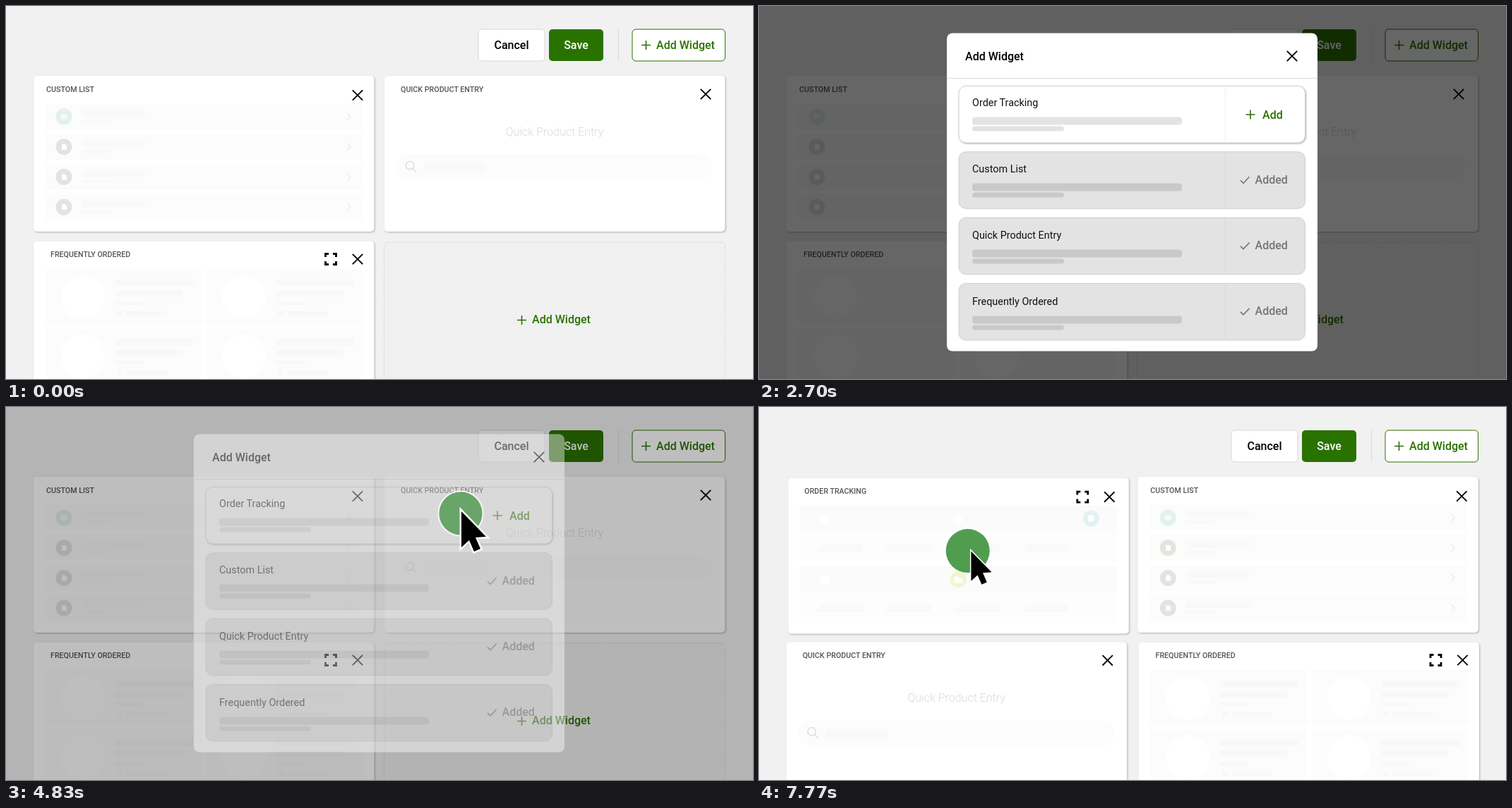
Recreate the animation shown at these times as an HTML page. Size 1058x529 px, loop 8000 ms.

```html
<!DOCTYPE html>
<html lang="en">
<head>
<meta charset="utf-8">
<title>Add and arrange widgets</title>
<style>
  html, body { margin: 0; width: 100%; height: 100%; overflow: hidden; background: #f1f1f1; }
  svg { display: block; width: 100vw; height: 100vh; font-family: Roboto, Inter, sans-serif; }
  .button { font-size: 16px; font-weight: 500; }
  .heading { font-size: 10.7px; font-weight: 500; fill: #555; }
  .label { font-size: 14.4px; fill: #111; }
  .card { fill: #fff; filter: drop-shadow(1px 1px 1px rgba(0, 0, 0, .28)); }
</style>
</head>
<body>
<svg id="stage" viewBox="0 0 1058 529"></svg>
<script>
const GREEN = '#2a7200';
const LOOP = 8000, STEP = 30;

// Drawing helpers
const rect = (x, y, w, h, fill, r = 0, more = '') =>
  `<rect x="${x}" y="${y}" width="${w}" height="${h}" rx="${r}" fill="${fill}" ${more}/>`;
const circle = (x, y, r, fill) => `<circle cx="${x}" cy="${y}" r="${r}" fill="${fill}"/>`;
const line = (d, color, width) =>
  `<path d="${d}" fill="none" stroke="${color}" stroke-width="${width}"/>`;
const text = (x, y, str, cls, more = '') => `<text x="${x}" y="${y}" class="${cls}" ${more}>${str}</text>`;
const group = (id, body) => `<g id="${id}">${body}</g>`;
const times = (n, draw) => Array.from({ length: n }, (_, i) => draw(i)).join('');

const cross = (x, y) => line(`M${x - 7.2} ${y - 7.2}l14.4 14.4m0 -14.4l-14.4 14.4`, '#000', 1.9);
const plus = (x, y) => line(`M${x - 6.5} ${y}h13M${x} ${y - 6.5}v13`, GREEN, 1.6);
const expand = (x, y) => line(
  `M${x - 7.5} ${y - 3}v-4.5h4.5m6 0h4.5v4.5m0 6v4.5h-4.5m-6 0h-4.5v-4.5`, '#000', 2.8);
const panel = (x, y, title, titleX, titleY) =>
  `<rect class="card" x="${x}" y="${y}" width="482.5" height="221" rx="5"/>` +
  text(titleX, titleY, title, 'heading');

function toolbar() {
  return rect(669, 33, 94, 45, '#fff', 5, 'stroke="#d8d8d8"') +
    text(716, 60.5, 'Cancel', 'button', 'text-anchor="middle"') +
    rect(769, 33, 77, 45, GREEN, 5) +
    text(807.5, 60.5, 'Save', 'button', 'text-anchor="middle" fill="#fff"') +
    line('M867.5 32v46', '#dadada', 1) +
    rect(887, 33, 131.5, 45, '#fff', 5, `stroke="${GREEN}"`) +
    plus(906.5, 55.5) + text(921, 60.5, 'Add Widget', 'button', `fill="${GREEN}"`);
}

function placeholder() {
  return rect(535.5, 335, 483, 221, '#f0f0f0', 5, 'stroke="#cfcfcf" stroke-dasharray="1.5 1.5"') +
    plus(730.5, 445.5) + text(745, 450, 'Add Widget', 'button', `fill="${GREEN}"`);
}

function customList() {
  return panel(39, 99, 'CUSTOM LIST', 57, 122) + cross(498, 126.5) + times(4, i => {
    const y = 157 + i * 42.7;
    const icon = i
      ? `<path d="M79 ${y - 4}h4.5l2.5 2.5v5.5h-7z" fill="#fff"/>`
      : rect(77.5, y - 3.5, 9, 7, '#f6fbfa', 1);
    return rect(56, y - 18.5, 449, 37, '#fcfcfc', 2) +
      circle(82, y, 11.5, i ? '#e3e4de' : '#e1f1ef') + icon +
      rect(108, y - 9, 89, 9, '#f9f9f9') + rect(108, y + 4, 40, 5, '#f9f9f9') +
      line(`M483 ${y - 5}l5 5l-5 5`, '#e9e9e9', 1.2);
  });
}

function quickEntry() {
  return panel(536, 99, 'QUICK PRODUCT ENTRY', 559, 122) + cross(991, 125) +
    text(777, 184, 'Quick Product Entry', '',
      'font-size="16" font-weight="300" text-anchor="middle" fill="#dadada"') +
    rect(553, 210, 448, 36, '#fcfcfc', 18) +
    `<circle cx="572" cy="226" r="5.7" fill="none" stroke="#ddd" stroke-width="1.5"/>` +
    line('M576 230.500l5 5', '#ddd', 1.5) + rect(592, 223, 88, 13, '#f9f9f9', 2);
}

function frequentlyOrdered() {
  return panel(39, 333.5, 'FREQUENTLY ORDERED', 63, 356) + expand(460, 359) + cross(498, 359) +
    times(4, i => {
      const x = 56 + (i % 2) * 228, y = 373 + (i >> 1) * 84;
      const bar = (dx, dy, w, h) => rect(x + dx, y + dy, w, h, '#f8f8f8');
      return rect(x, y, 222, 79, '#fcfcfc', 2) + circle(x + 53, y + 40, 31, '#fff') +
        bar(99, 15, 110, 9) + bar(99, 30, 95, 9) + bar(99, 46, 40, 5) +
        circle(x + 105, y + 63, 4, '#f8f8f8') + bar(115, 60, 57, 6);
    });
}

function orderTracking() {
  return panel(536, 335, 'ORDER TRACKING', 559, 357) + expand(953, 362) + cross(991, 362) +
    times(2, i => {
      const y = 374 + i * 86;
      const dots = circle(588, y + 20, 7, '#fff') + (i
        ? circle(777, y + 19, 11.5, '#f3f5cd') +
          `<path d="M771 ${y + 15}h7v2h3l2.500 3v4h-12.500z" fill="#fff"/>`
        : circle(776, y + 20, 7, '#fff') + circle(965, y + 18.5, 11.5, '#e3f2f1') +
          rect(961, y + 14, 8, 9, '#fff', 1));
      return rect(552, y, 449.5, 38, '#fbfbfb', 2) + rect(552, y + 38, 449.5, 42, '#fdfdfd', 2) + dots +
        times(4, k => rect(582 + k * 97, y + 55, 60, 4, '#f9f9f9') +
          rect(577 + k * 97, y + 60, 64, 5, '#f9f9f9'));
    });
}

function modal() {
  const names = ['Order Tracking', 'Custom List', 'Quick Product Entry', 'Frequently Ordered'];
  return rect(266, 38.5, 525, 451, '#fff', 8) + text(292, 77, 'Add Widget', 'button') + cross(755, 71) +
    line('M266 102.500h525', '#d9d9d9', 1.2) +
    names.map((name, i) => {
      const y = 113.5 + i * 93.3, row = i * 94;
      const bar = i ? '#c9c9c9' : '#e3e3e3';
      const action = i
        ? line(`M682 ${y + 40.500}l4 4l8.500 -9`, '#757575', 1.6) +
          text(702.5, y + 45, 'Added', 'button', 'fill="#757575"')
        : plus(696, 154) + text(713, 159.5, 'Add', 'button', `fill="${GREEN}"`);
      return `<rect x="283" y="${y}" width="490.500" height="80.500" rx="10" fill="${i ? '#e3e3e3' : '#fff'}"
        stroke="#cfcfcf" ${i ? '' : 'style="filter:drop-shadow(1px 1.5px 1px rgba(0,0,0,.3))"'}/>` +
        line(`M660 ${y}v80.500`, i ? '#d9d9d9' : '#eee', 1) +
        text(302, 142 + row, name, 'label') +
        rect(302, 157.5 + row, 297, 11, bar, 4) + rect(302, 170.5 + row, 130, 7, bar, 3.5) + action;
    }).join('');
}

const stage = document.getElementById('stage');
stage.innerHTML = rect(0, 0, 1058, 529, '#f1f1f1') + toolbar() +
  group('placeholder', placeholder()) + group('frequent', frequentlyOrdered()) +
  group('quick', quickEntry()) + group('custom', customList()) + group('order', orderTracking()) +
  rect(0, 0, 1058, 529, '#000', 0, 'id="shade"') + group('modal', modal()) +
  group('cursor',
    `<circle id="halo" r="31" fill="#268626"/>
     <circle id="ring" r="31.5" fill="none" stroke="#fff" stroke-width="2"/>
     <path id="arrow" d="M0 0V51L11 41L18 57L27 53L20 37L35 36Z" stroke="#fff" paint-order="stroke"/>`);

const el = Object.fromEntries([...stage.querySelectorAll('[id]')].map(node => [node.id, node]));
const set = (node, attrs) => Object.entries(attrs).forEach(([k, v]) => node.setAttribute(k, v));

// Timing helpers
const span = (t, from, to) => Math.min(1, Math.max(0, (t - from) / (to - from)));
const mix = (a, b, p) => a + (b - a) * p;
const easeInOut = p => p < .5 ? 2 * p * p : 1 - 2 * (1 - p) ** 2;
const easeOut = p => 1 - (1 - p) ** 1.65;
const shift = (x, y, p) => ({ transform: `translate(${x * p} ${y * p})` });

function drawCursor(t, drag) {
  const first = t < 3000;
  const visible = first ? span(t, 900, 1020) - span(t, 2580, 2700) : span(t, 3480, 3600);
  const press = first ? span(t, 1770, 1860) : span(t, 4350, 4440);
  const click = press * (1 - span(t, 5160, 5280));
  const hold = span(t, 6240, 6360);
  const move = easeInOut(span(t, 5310, 5970));

  const x = first ? 929 : mix(mix(644, 763, move), 293.5, drag);
  const y = first ? 55 : mix(mix(151, 428, move), 203, drag);
  const scale = 1 - .28 * press * (1 - press) - .17 * hold;
  const dx = 1 + (1 - scale) * 22 - (first ? 3 : 0);
  const dy = -3 + (1 - scale) * 20 + (first ? 6 : 0);

  set(el.cursor, { transform: `translate(${x} ${y})`, opacity: visible });
  set(el.halo, { 'fill-opacity': .17 + .45 * click + .63 * hold });
  set(el.ring, { opacity: .8 * click });
  set(el.arrow, {
    transform: `translate(${dx} ${dy}) scale(${scale})`,
    'stroke-width': 3.5 + 1.5 * click
  });
}

function draw(time) {
  const t = Math.floor(time / STEP) * STEP;

  const enter = span(t, 1800, 2640);
  const open = enter - span(t, 4380, 5160);
  const zoom = mix(.764, 1, enter);
  set(el.shade, { opacity: .6 * open });
  set(el.modal, {
    opacity: open,
    transform: `translate(528.5 264) scale(${zoom}) translate(-528.5 -264)`
  });

  const appear = span(t, 5160, 5340);
  const drag = easeOut(span(t, 7020, 7800));
  const pop = mix(1.06, 1, appear);
  set(el.placeholder, { opacity: appear < 1 ? 1 : 0 });
  set(el.order, {
    opacity: appear,
    transform: `translate(${777 - 497 * drag} ${445 - 235.5 * drag}) scale(${pop}) translate(-777 -445)`
  });

  const swap = easeInOut(span(t, 7240, 7720));
  set(el.custom, shift(497.3, 0, swap));
  set(el.quick, shift(-497.3, 234.3, swap));
  set(el.frequent, shift(498.5, 0, swap));

  drawCursor(t, drag);
}

const start = performance.now();
function tick() {
  draw((performance.now() - start) % LOOP);
  requestAnimationFrame(tick);
}
tick();
</script>
</body>
</html>
```
